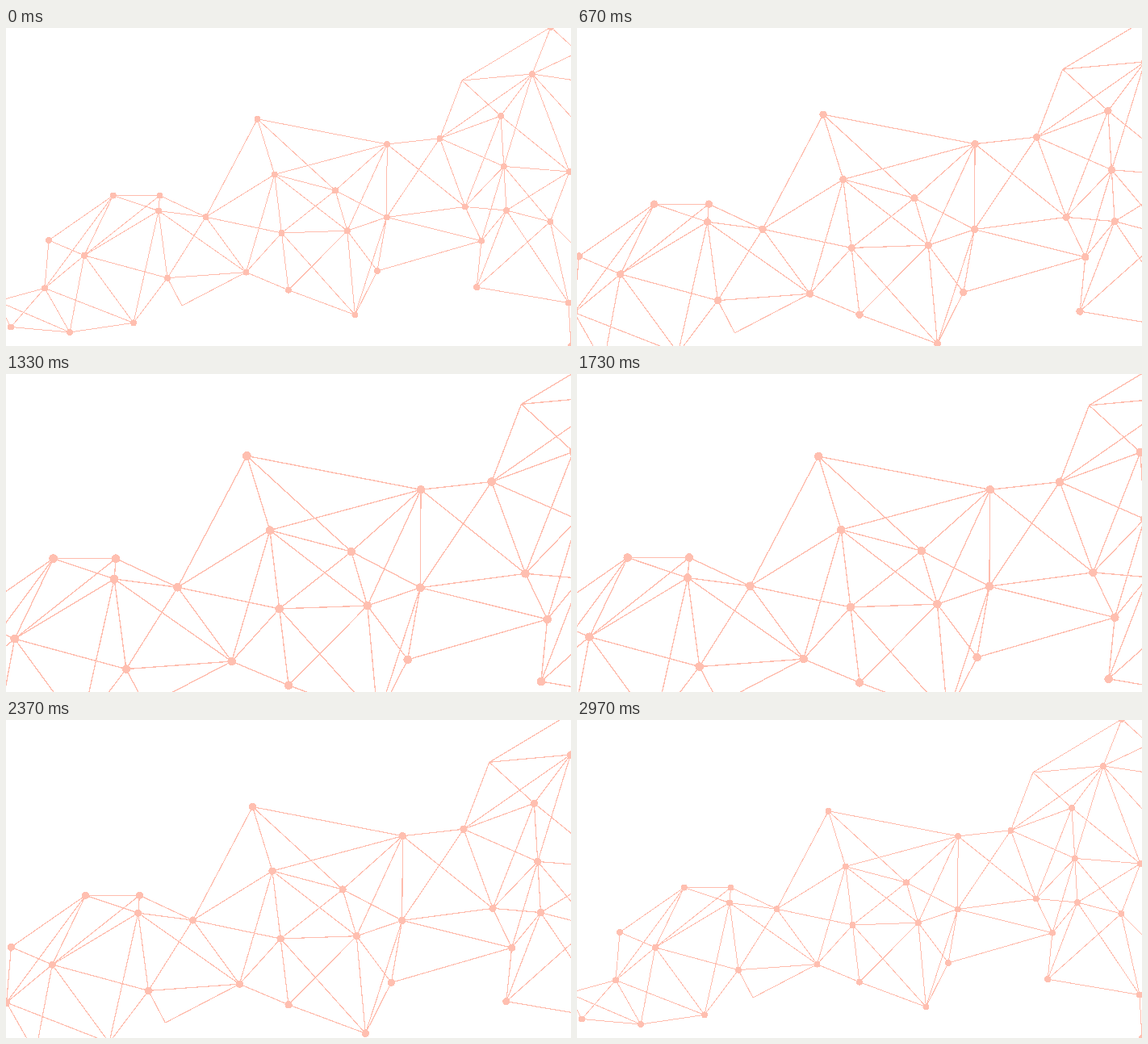
These frames come from a looping animation (700 by 394 pixels, 3030 ms). An HTML page:

```html
<!DOCTYPE html>
<html lang="en">
<head>
<meta charset="utf-8">
<title>Network</title>
<style>
  @property --zoom {
    syntax: "<number>";
    inherits: false;
    initial-value: 1;
  }
  html, body {
    margin: 0;
    width: 100%;
    height: 100%;
    overflow: hidden;
    background: #fff;
  }
  svg {
    display: block;
    width: 100%;
    height: 100%;
    shape-rendering: crispEdges;
  }
  #net {
    transform-origin: 349.7px 146px;
    transform: scale(var(--zoom));
    animation: zoom 3030ms -4ms infinite;
  }
  #links { fill: none; stroke: #ffbcad; stroke-width: 1; }
  #dots { fill: #ffbfb0; }

  /* 45 steps in, 44 steps out, then a short hold; 30 steps per second */
  @keyframes zoom {
    0% { --zoom: 1; animation-timing-function: steps(45); }
    49.505% { --zoom: 1.384; animation-timing-function: steps(44); }
    97.91%, 100% { --zoom: 1; }
  }
</style>
</head>
<body>
<svg viewBox="0 0 700 394">
  <g id="net">
    <path id="links"/>
    <g id="dots"></g>
  </g>
</svg>
<script>
  const nodes = {
    a: [311.5, 112.8], b: [332.7, 181.5], c: [472.2, 144], d: [408, 201.3],
    e: [341.5, 254], f: [422.8, 251.2], g: [471.6, 234.5], h: [460, 301],
    i: [432.4, 355.4], j: [350, 324.7], k: [297.5, 302.6], l: [247.5, 234.2],
    m: [190.5, 207.6], n: [189, 226.5], o: [132.7, 207.6], p: [97, 281.8],
    q: [53, 263], r: [48, 322.4], s: [6, 370.5], t: [79, 377],
    u: [158, 365.3], v: [200, 309.7], w: [218, 344],
    A: [537.5, 136.7], B: [568.7, 221.5], C: [589, 263.7], D: [583.2, 321.2],
    E: [620, 226], F: [616.8, 171.4], G: [613, 109], H: [652, 57],
    I: [565, 65], J: [675, -1], K: [698, 178], L: [674.3, 240],
    M: [697, 340.5], N: [700, 394],
    // beyond the stage
    X: [-10.7, 338.4], Y: [709, 30], Z: [725, 68], Q: [730, 143],
    R: [726, 292], S: [730, 341]
  };
  const bare = "wI";

  // Each word: a node followed by its neighbours
  const links = "abcdl bcdefkl cdfgAB defg efijkl fghij ghiABC hiC jik klnvw " +
    "lmnv mnop nopuv opqr pqrtuv qr rstuX stX tuX uv vw " +
    "ABFGHI BCEFG CDEF DELM EFKLM FGHKL GHIK HIJKYZQ IJ JY KL LMR MNS";

  const get = id => document.getElementById(id);

  get("links").setAttribute("d", links.split(" ").map(([from, ...ends]) =>
    ends.map(end => `M${nodes[from]}L${nodes[end]}`).join("")
  ).join(""));

  get("dots").innerHTML = Object.entries(nodes)
    .filter(([name]) => !bare.includes(name))
    .map(([, [x, y]]) => `<circle cx="${x}" cy="${y}" r="4"/>`)
    .join("");
</script>
</body>
</html>
```
